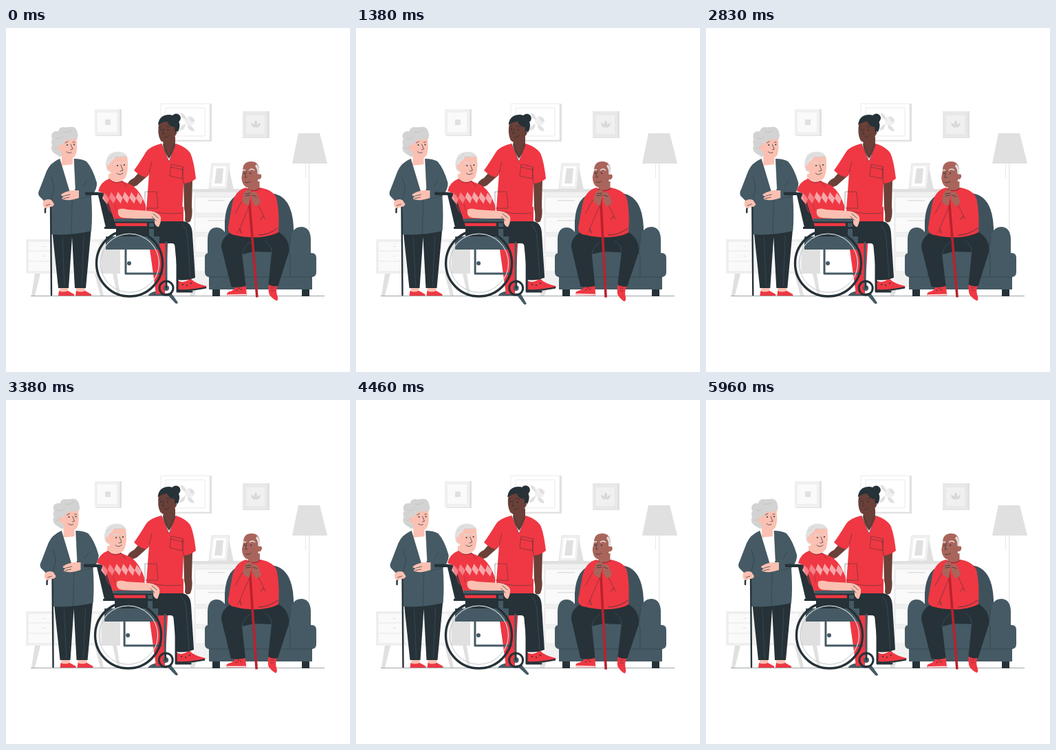
An HTML page for the animation above (6 s loop, 500 px wide and 500 px high).

```html
<!DOCTYPE html>
<html lang="en">
<head>
<meta charset="utf-8">
<title>Care home</title>
<style>
html, body { margin: 0; width: 100%; height: 100%; overflow: hidden; background: #fff; }
svg { display: block; width: 100vw; height: 100vh; }
.red { fill: #ef3843; }
.deep { fill: #b9222f; }
.dark { fill: #263238; }
.slate { fill: #455a64; }
.pale { fill: #fbc0b1; }
.brown { fill: #a9655b; }
.umber { fill: #6b4038; }
.g1 { fill: #fafafa; }
.g2 { fill: #f0f0f0; }
.g3 { fill: #e0e0e0; }
.line { fill: none; stroke: #263238; stroke-width: .7; stroke-linecap: round; stroke-linejoin: round; }
.thin { fill: none; stroke: #263238; stroke-width: .45; }
.edge { fill: none; stroke: #e0e0e0; stroke-width: .7; }
.soft { fill: none; stroke: #7e8b92; stroke-width: .5; }
.bar { fill: none; stroke: #263238; stroke-linecap: round; stroke-linejoin: round; }
</style>
</head>
<body>
<svg viewBox="0 0 500 500" xmlns="http://www.w3.org/2000/svg">

<!-- room -->
<g>
  <path class="g3" d="M129 118H168V157H131Z"/>
  <path class="g2" d="M129 118H165V156H129Z"/>
  <path class="g1" d="M133 123H161V151H133Z"/>
  <path class="g3" d="M144 133H152V141H144Z"/>

  <path class="g3" d="M225 110H299V165H228Z"/>
  <path fill="#fff" stroke="#e6e6e6" stroke-width=".8" d="M225 110H296V163H225Z"/>
  <path class="edge" d="M232 116H289V157H232Z"/>
  <circle cx="267" cy="135" r="7" class="g2"/>
  <path class="g3" d="M262 134Q254 131 254 123Q261 125 262 134ZM261 139Q254 142 251 149Q260 150 261 139ZM264 141Q272 142 274 150Q264 150 264 141ZM266 129Q273 129 274 136Q268 138 266 129Z"/>

  <path class="g3" d="M344 121H383V160H344Z"/>
  <path fill="#e8e8e8" d="M344 121H380V159H344Z"/>
  <path class="g2" d="M349 127H376V154H349Z"/>
  <path fill="#d6d6d6" d="M363 134Q367 139 363 145Q359 139 363 134ZM356 138Q362 139 362 145Q357 144 356 138ZM370 138Q364 139 364 145Q369 144 370 138Z"/>

  <path class="g2" d="M439.5 197H442V376H439.5Z"/>
  <path class="edge" d="M435.5 197V218"/>
  <path class="g3" d="M425 153H456L467 197H416Z"/>

  <path class="g2" d="M29 307H141V357H29Z"/>
  <path class="g3" d="M139 307H166V357H139Z"/>
  <path fill="#fafafa" stroke="#e0e0e0" stroke-width=".6" d="M32 310H67V354H32ZM71 310H136V354H71Z"/>
  <path class="edge" d="M32 324H67M32 339H67"/>
  <path class="g3" d="M54 317h4v1h-4zM54 331h4v1h-4zM42 357H50L42 389H37ZM129 357H135L142 389H137ZM155 357H161L166 389H162Z"/>

  <path class="g2" d="M273 238H345V376H273Z"/>
  <path class="g3" d="M271 234H348V238.5H271ZM266 376H273L272 389H268ZM273 376H278L274 389H270Z"/>
  <path fill="#fafafa" stroke="#e0e0e0" stroke-width=".6" d="M275 246H340V269H275ZM275 275H340V297H275ZM275 303H340V326H275ZM275 332H340V354H275Z"/>
  <path class="g3" d="M293 250H318V251.5H293ZM293 279H318V280.5H293ZM293 307H318V308.5H293Z"/>
  <path class="g3" d="M323 198L331 235H320Z"/>
  <path class="g2" stroke="#dcdcdc" stroke-width=".7" d="M299 197H325L321 234H295Z"/>
  <path fill="#fff" d="M302 201H320L318 230H299Z"/>
  <path class="g3" d="M306 204H316L314 226H303Z"/>
  <path class="thin" d="M36 389.5H463"/>
</g>

<!-- armchair -->
<g>
  <path class="dark" d="M300 378H311V390H300ZM430 378H441V390H430Z"/>
  <path fill="#3f525c" d="M318 330V281Q320 243 347 239L384 240Q416 242 418 290V330Z"/>
  <path class="slate" d="M293 331V306Q294 290 306 290Q318 290 322 307L327 332ZM411 332L414 302Q418 289 430 289Q442 290 443 306V332Z"/>
  <path class="slate" d="M289 333Q289 327 295 327L323 331L326 323H410L413 331L444 327Q451 327 451 334V355Q451 361 445 362V380H295V362Q289 361 289 355Z"/>
  <path class="thin" d="M295 362H445M323 331L326 323H410L413 331V361M323 331V361M322 307L325 325M414 302L411 324"/>
</g>

<!-- man in armchair -->
<g>
  <g id="legs">
    <g id="shoeL">
      <path fill="#f4a9a5" d="M333 374H347L348 382H335Z"/>
      <path class="red" d="M333 375Q340 378 348 374L349 387H321Q319 385 323 383Q332 381 333 375Z"/>
      <path fill="#fff" d="M320.5 386.5H349V388.5H321Z" stroke="#ef3843" stroke-width=".5"/>
      <path d="M334 381h2M337 378h2M340 380h2" stroke="#263238" stroke-width="1"/>
    </g>
    <g id="shoeR">
      <path class="red" d="M381 373L394 375Q391 382 393 389Q395 395 392 397Q386 394 382 388Q380 384 381 373Z"/>
      <path d="M384 378h6M385 382h4" stroke="#263238" stroke-width=".9" stroke-dasharray="1.4 1.4"/>
    </g>
    <path class="dark" d="M328 296Q312 305 313 319L327 376Q338 378 348 375L343 329L360 325L386 326L381 373Q387 377 395 375L411 326Q413 306 395 296Z"/>
    <path d="M343 329Q345 317 355 311M386 326Q386 315 376 309" fill="none" stroke="#455a64" stroke-width=".6"/>
  </g>
  <g id="torso">
    <path class="brown" d="M352 223H369V238H352Z"/>
    <path class="red" d="M349 232Q333 236 329 256Q326 273 323 289Q322 300 334 301Q348 305 370 304Q388 302 396 297Q398 272 394 250Q391 236 370 232Q359 239 349 232Z"/>
    <path class="line" d="M340 259Q334 280 342 298M380 262Q377 272 370 278M367 301Q382 301 395 291M351 234Q361 240 370 233" stroke-width=".5"/>
    <path class="red" d="M323 289L344 250Q349 249 354 258L337 298Q324 304 323 289ZM394 262L377 252Q373 250 366 256L377 278Q393 284 394 262Z"/>
    <path class="thin" d="M354 258L337 298M366 256L377 278M344 250L333 270"/>
    <g id="sitterHead">
      <path class="brown" d="M345 207Q345 194 357 194Q369 194 369 208L368 213Q372 211 372 216Q371 221 367 220Q366 231 356 232Q344 233 343 217Z"/>
      <path class="g3" d="M365 198Q370 202 369 213L366 212Q367 205 363 201Z"/>
      <path d="M354 207Q358 203 362 207M345 207Q347 205 349 207" fill="none" stroke="#e0e0e0" stroke-width="1.5"/>
      <path class="line" d="M350 208L348 217H351M348 224Q352 226 356 223"/>
      <circle cx="347" cy="211" r="1" class="dark"/><circle cx="356" cy="211" r="1" class="dark"/>
    </g>
  </g>
  <path id="cane" fill="none" stroke="#b9222f" stroke-width="3.6" d="M353.6 236L364.1 391.5"/>
  <g id="hands">
    <path class="brown" d="M346 242Q348 235 354 235Q358 235 358 240L356 248L354 258Q348 258 344 251ZM358 239Q364 236 367 243L371 253Q368 259 363 259L358 250Z"/>
    <path class="line" d="M349 241L356 240M349 244L356 243M359 243L365 245" stroke-width=".4"/>
  </g>
</g>

<!-- nurse -->
<g>
  <path class="slate" d="M207 388Q211 383 222 382H231V389H207Z"/>
  <path class="red" d="M204 260H258V284L236 300L231 386L218 387L206 300Z"/>
  <path class="umber" d="M200 202L186 218Q176 222 176 231Q182 233 190 229L208 213ZM258 221H271L270 259Q272 272 268 281Q262 285 260 279Q261 270 259 263Z"/>
  <path class="umber" d="M230 158H246V172Q242 183 237 190Q230 181 228 170Z"/>
  <path class="red" d="M226 168Q208 172 203 181Q194 196 186 207Q194 215 204 217L208 211L204 264Q230 271 256 268L258 226Q267 226 276 219Q273 193 268 182Q262 173 247 168L237 194Z"/>
  <path class="thin" d="M226 168L237 194L247 168M229 168L237 188L245 168M208 211L212 194M258 226L256 203M202 238H219L221 262H202ZM240 198L258 202L256 219L238 215ZM239.5 202L257 206M204 265Q230 272 256 269"/>
  <g id="nurseHead">
    <circle cx="247" cy="131" r="6.5" class="dark"/>
    <path class="umber" d="M222 138Q219 153 224 163Q232 171 242 162L250 150Q252 144 247 136L237 130Z"/>
    <path class="dark" d="M220.500 141Q222 126 237 126Q250 127 252 141Q252 149 247 152Q244 149 245 144Q237 144 234 136Q228 136 220.500 141Z"/>
    <path class="line" d="M229 146L227 154H230M230 159Q234 160 237 156M222 144L226 143M232 143Q235 142 238 144"/>
    <circle cx="225" cy="147.500" r="1.100" class="dark"/><circle cx="235" cy="148" r="1.100" class="dark"/>
    <path d="M248 150v3" stroke="#e0e0e0" stroke-width="1"/>
  </g>
</g>

<!-- standing woman -->
<g id="woman">
  <path class="pale" d="M78 376H90V384H78ZM102 376H115V384H102Z"/>
  <path class="red" d="M77 382Q83 385 90 382L99 387V389H76ZM102 382Q108 385 115 382L124 387V389H101Z"/>
  <path class="dark" d="M67 293L76 378H91L96 304L100 378H116L124 290Z"/>
  <path d="M82 304L85 375M113 302L110 375" stroke="#455a64" stroke-width=".5" fill="none"/>
  <path class="pale" d="M81 185H97V203H81Z"/>
  <path fill="#fff" d="M79 200L99 198L103 238L94 250Z"/>
  <path class="slate" d="M78 190Q64 196 59 208L49 234Q45 241 49 245L60 256L66 250L65 300Q95 302 124 295Q126 275 124 244Q133 233 132 225Q126 204 117 194Q110 190 99 190L101 232L96 250Z"/>
  <path class="thin" d="M78 190L96 250L95 300M99 190L101 232M66 250L70 232L66 217M124 244L106 248M118 221L107 237"/>
  <path class="slate" d="M131 224Q133 234 125 243L106 248L104 236L117 226Z"/>
  <path class="pale" d="M106 236L95 236Q85 238 80 242Q80 245 85 244Q80 247 82 249Q92 252 106 247Z"/>
  <path class="line" d="M85 244L93 242M83 248L92 246" stroke-width=".4"/>
  <path class="bar" d="M57 268V263Q58 258 65 257L66 388" stroke-width="2.400"/>
  <path class="pale" d="M54 252Q59 247 66 250L70 256Q69 260 64 260L57 262Q52 259 54 252Z"/>
  <path class="line" d="M58 258L64 256" stroke-width=".4"/>
  <g fill="#d3d3d3">
    <path d="M72 156Q78 143 93 144Q107 148 104 160L98 170L80 186Q66 183 66 174Q69 169 69 164Z"/>
    <circle cx="73" cy="157" r="7"/><circle cx="73" cy="174" r="7"/><circle cx="83" cy="151" r="7"/><circle cx="95" cy="152" r="8.500"/><circle cx="75" cy="166" r="9"/><circle cx="79" cy="182" r="5"/>
  </g>
  <path class="pale" d="M81 168Q86 168 87 162Q96 164 102 160Q105 175 101 185Q97 191 89 190Q81 187 80 179Q75 178 75 173Q77 168 81 171Z"/>
  <path d="M72 160Q78 163 83 157M83 151Q91 153 96 148M70 174Q75 177 77 171" fill="none" stroke="#b8b8b8" stroke-width=".6"/>
  <path class="line" d="M94 169L97 176L94 177M88 180Q91 183 95 181M86 167L90 165M97 166L100 166"/>
  <circle cx="89" cy="170" r="1" class="dark"/><circle cx="99" cy="169.500" r="1" class="dark"/>
</g>

<!-- wheelchair and its rider -->
<g id="chair">
  <path class="dark" d="M115 238.500H133L145 240L161 290H145L134 243H116Q114 241 115 238.500Z"/>
  <path class="red" d="M250 367Q258 372 268 364Q276 372 291 375Q293 378 288 379L250 381Z"/>
  <path class="dark" d="M249 380Q270 381 291 376V378.500Q275 382 249 383Z"/>
  <path d="M256 373h2M262 374h2M268 371h2" stroke="#263238" stroke-width="1.300"/>
  <path class="dark" d="M160 281H258Q270 282 271 299L275 363Q262 368 250 366L245 313H160Z"/>
  <path d="M256 286Q263 291 264 306L268 363" fill="none" stroke="#455a64" stroke-width=".6"/>
  <path class="pale" d="M149 212H166V226H149Z"/>
  <path class="red" d="M150 219Q137 224 134 237L146 242L160 288H205L203 258Q197 239 184 229L168 222Q158 227 150 219Z"/>
  <g fill="#f7a6a8" id="argyle"></g>
  <path class="thin" d="M151 220Q159 229 170 222M160 265L157 252M168 222L176 231"/>
  <path class="red" d="M138 232Q150 227 157 239L165 263Q161 278 149 266Z" opacity=".35"/>
  <path class="pale" d="M163 264Q168 261 177 264L210 266Q222 268 225 275Q226 281 222 289Q218 290 215 281L206 278L171 276Q161 275 163 264Z"/>
  <path class="line" d="M214 270L221 276M212 274L218 280" stroke-width=".4"/>
  <g id="riderHead">
    <path class="g3" d="M147 207Q142 197 149 185Q155 179 166 180Q175 181 177 190L168 196L151 210Z"/>
    <path class="pale" d="M151 196Q157 192 159 187Q168 188 176 187Q179 204 174 217Q168 225 158 220Q152 217 152 208Q147 207 147 201Q148 197 151 199Z"/>
    <path d="M148 190Q153 190 157 183M159 187Q168 188 175 186" fill="none" stroke="#c4c4c4" stroke-width=".6"/>
    <path d="M158 197Q161 194 165 196M170 196L174 195" fill="none" stroke="#d8d8d8" stroke-width="1.600"/>
    <path class="line" d="M167 199L170 207L166 208M161 211Q165 215 170 211"/>
    <circle cx="162" cy="200" r="1" class="dark"/><circle cx="172" cy="199" r="1" class="dark"/>
  </g>
  <path class="slate" d="M158 277H214Q216 277 216 279V283H158ZM145 303H223V322H145ZM208 283H215V303H208Z"/>
  <path class="dark" d="M143 289H215V292H143ZM158 281.500H216V283.500H158Z"/>
  <path class="bar" stroke-width="3" d="M224 311H240Q248 312 249 321L249 383H270"/>
  <path class="bar" style="stroke:#455a64" stroke-width="3" d="M174 322V357H227M233 312V374"/>
  <circle cx="179.500" cy="342" r="48" class="bar" stroke-width="3.400"/>
  <circle cx="179.500" cy="342" r="43" fill="none" stroke="#fff" stroke-width="1"/>
  <circle cx="179.500" cy="342" r="42.300" class="soft"/>
  <circle cx="179" cy="342" r="3" class="slate"/>
</g>

<g id="caster">
  <path class="slate" d="M227 386Q234 386 240 385L250 399Q249 402 246 400L236 389Z"/>
  <circle cx="233" cy="378" r="10" class="bar" stroke-width="3"/>
  <circle cx="233" cy="378" r="4" class="slate"/>
  <path class="bar" stroke-width="2" d="M233 367V378"/>
</g>
</svg>

<script>
const LOOP = 6000, TAU = Math.PI * 2;
const el = id => document.getElementById(id);

// Sweater diamonds along a shallow arc
let diamonds = "";
for (let i = 0; i < 6; i++) {
  const x = 145 + i * 9.8, y = 247.5 - Math.sin(i / 5 * Math.PI) * 1.5;
  diamonds += `<path d="M${x - 2} ${y - 8}L${x + 5} ${y + 1}L${x + 2} ${y + 9}L${x - 5} ${y}Z"/>`;
}
el("argyle").innerHTML = diamonds;

const slide = (id, x, y = 0) => el(id).setAttribute("transform", `translate(${x} ${y})`);
const turn = (id, deg, x, y, dx = 0) =>
  el(id).setAttribute("transform", `translate(${dx} 0) rotate(${deg} ${x} ${y})`);

// Sideways drift of the standing woman: [time, offset]
const drift = [[0, 0], [700, .4], [1380, 1.5], [2000, 2.8], [2830, 2.3],
  [3920, 2.8], [5040, 2.2], [5600, 1.4], [6000, 0]];

function driftAt(t) {
  const i = drift.findIndex(p => p[0] > t);
  const [t0, a] = drift[i - 1], [t1, b] = drift[i];
  const k = (t - t0) / (t1 - t0);
  return a + (b - a) * k * k * (3 - 2 * k);
}

function draw(now) {
  const t = now % LOOP;
  const slow = Math.sin(TAU * t / LOOP);
  const roll = Math.cos(TAU * t / LOOP) - 1;
  const sway = Math.cos(TAU * (t + 350) / 3000);

  slide("woman", driftAt(t));
  turn("nurseHead", slow * 1.5, 236, 168, .4);
  slide("chair", roll);
  turn("riderHead", slow * .8, 160, 220);
  turn("caster", slow * 5, 233, 378, roll * .4);

  turn("cane", -sway, 359.3, 329);
  turn("hands", -sway * .9, 359.3, 329);
  turn("torso", -sway * .45, 360, 302);
  turn("sitterHead", -sway * .8, 358, 234);
  turn("legs", -sway * .55, 360, 302);
  turn("shoeL", -sway * 1.5, 341, 374);
  turn("shoeR", -sway * 3, 387, 374);
}

function frame() {
  draw(performance.now());
  requestAnimationFrame(frame);
}
frame();
</script>
</body>
</html>
```
